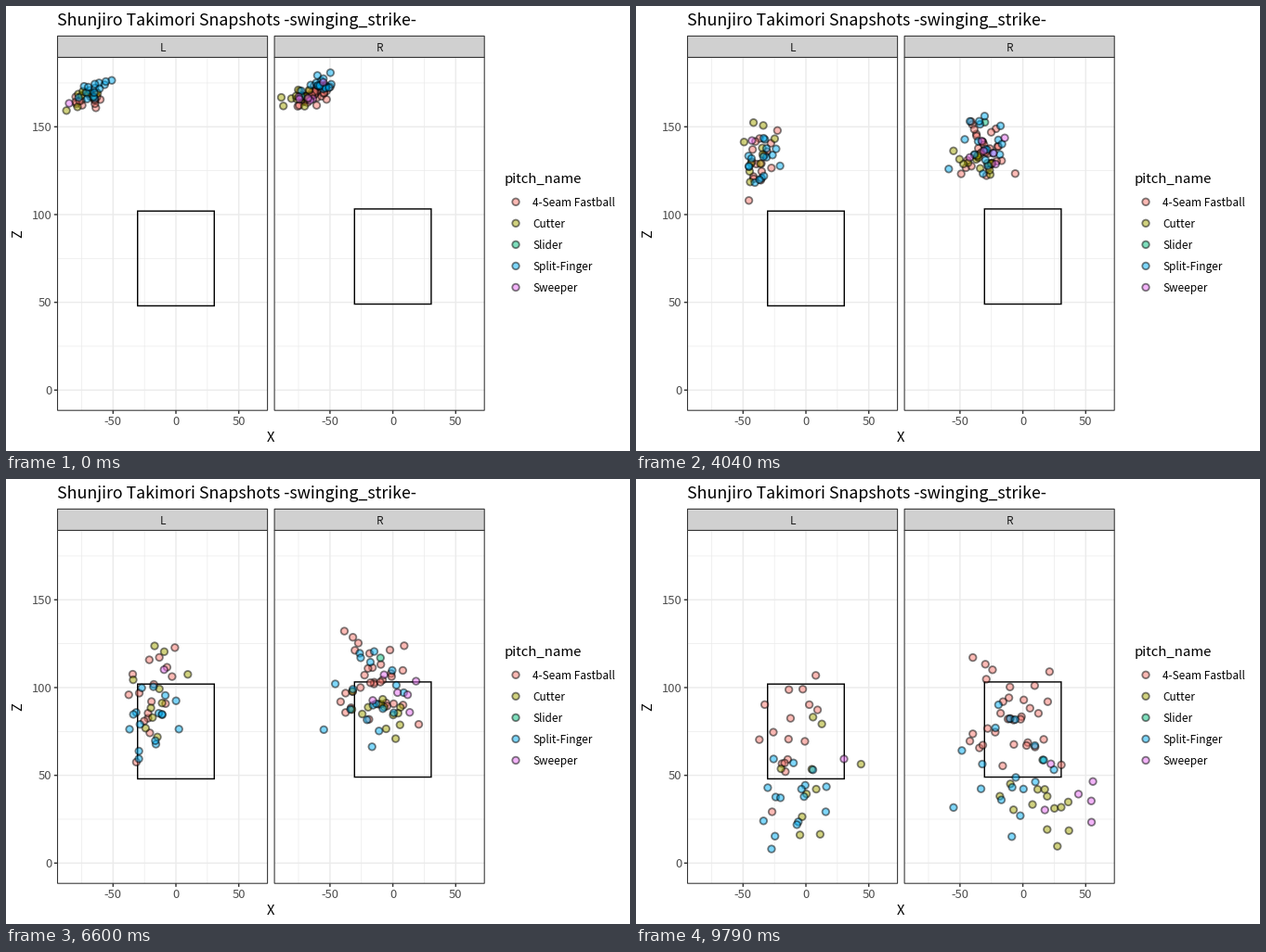
These frames come from a looping animation (672 px wide and 480 px high, 10 s). A matplotlib script:

```python
import numpy as np
import matplotlib.pyplot as plt
from matplotlib.animation import FuncAnimation
from matplotlib.colors import to_rgba
from matplotlib.patches import Rectangle

W, H, DPI = 672, 480, 96
PT = 72 / DPI                  # points per pixel
FRAMES, LOOP_MS = 47, 10000
TOP, BOTTOM = 55.4, 436.2
DARK, GRID = "#333333", "#EBEBEB"

# Colour, arrival frame and the (x, y) bend of the flight path in pixels.
PITCHES = {
    "4-Seam Fastball": ("#F8766D", 38, (-36, 62)),
    "Cutter": ("#A3A500", 43.2, (-8, 150)),
    "Slider": ("#00BF7D", 45, (27, 200)),
    "Split-Finger": ("#00B0F6", 40.4, (-33, 150)),
    "Sweeper": ("#E76BF3", 45.2, (22, 160)),
}

plt.rcParams["font.family"] = ["Noto Sans CJK JP", "DejaVu Sans"]
plt.rcParams["path.snap"] = False
fig = plt.figure(figsize=(W / DPI, H / DPI), dpi=DPI, facecolor="white")
ax = fig.add_axes([0, 0, 1, 1])
ax.set(xlim=(0, W), ylim=(H, 0))
ax.axis("off")


def label(x, y, text, size=11.8, color="black", **kw):
    ax.text(x, y, text, fontsize=size * PT, color=color, **kw)


def tick_label(x, y, value, ha):
    label(x, y, str(value), 13, "#4D4D4D", ha=ha)


def line(x0, y0, x1, y1, color=GRID, width=1.42):
    ax.plot([x0, x1], [y0, y1], color=color, lw=width * PT, zorder=1,
            solid_capstyle="butt")


def box(x0, y0, x1, y1, fill, edge, width, z):
    ax.add_patch(Rectangle((x0, y0), x1 - x0, y1 - y0, facecolor=fill,
                           edgecolor=edge, lw=width * PT, zorder=z))


def dots(xy, names, z):
    return ax.scatter(xy[:, 0], xy[:, 1], s=(7.5 * PT) ** 2, lw=1.8 * PT,
                      facecolors=[to_rgba(PITCHES[n][0], 0.5) for n in names],
                      edgecolors=[(0, 0, 0, 0.5)], zorder=z)


def z_px(z):
    return 414.3 - 1.8933 * z


def panel(left, title, zone_low, zone_high):
    right, zero = left + 226.1, left + 127.5

    def x_px(x):
        return zero + 1.354 * x

    for x in (-75, -25, 25):
        line(x_px(x), TOP, x_px(x), BOTTOM, width=0.7)
    for z in (25, 75, 125, 175):
        line(left, z_px(z), right, z_px(z), width=0.7)
    for z in (0, 50, 100, 150):
        line(left, z_px(z), right, z_px(z))
    for x in (-50, 0, 50):
        line(x_px(x), TOP, x_px(x), BOTTOM)
        line(x_px(x), BOTTOM, x_px(x), BOTTOM + 3.7, DARK)
        tick_label(x_px(x), 452, x, "center")
    box(x_px(-30.5), z_px(zone_high), x_px(30.5), z_px(zone_low),
        "none", "black", 1.42, 3)
    box(left, TOP, right, BOTTOM, "none", DARK, 1.07, 6)
    box(left, 32.4, right, TOP, "#D0D0D0", DARK, 1.07, 6)
    label((left + right) / 2, 49, title, color="#1A1A1A", ha="center", zorder=7)


panel(55.5, "L", 48, 102)
panel(289.1, "R", 49, 103.2)
for z in (0, 50, 100, 150):
    line(51.8, z_px(z), 55.5, z_px(z), DARK)
    tick_label(49.3, z_px(z) + 4.7, z, "right")

label(55, 21, "Shunjiro Takimori Snapshots -swinging_strike-", 17.8)
label(285, 470, "X", 14.7, ha="center")
label(13, 246, "Z", 14.7, ha="center", va="center", rotation=90)
label(537, 191, "pitch_name", 14.9)
legend_y = 211.3 + 23.04 * np.arange(len(PITCHES))
for name, y in zip(PITCHES, legend_y):
    label(567.3, y + 4.7, name)
dots(np.column_stack([np.full(len(PITCHES), 549.0), legend_y]), PITCHES, 5)

rng = np.random.default_rng(7)


def scatter_unit(count):
    """Random 2D points with zero mean and unit spread."""
    if count == 1:
        return np.zeros((1, 2))
    p = np.clip(rng.standard_normal((count, 2)), -1.9, 1.9)
    return (p - p.mean(axis=0)) / p.std(axis=0)


def throw(name, count, release, target, spread=(0, 0)):
    """Start, end, bend and arrival of every pitch in one group."""
    _, arrival, bend = PITCHES[name]
    start = scatter_unit(count) * (9, 5)
    start[:, 1] -= 0.35 * start[:, 0]      # wider arm slots release lower
    end = target + scatter_unit(count) * spread
    when = arrival + 0.7 * scatter_unit(count)[:, :1]
    return [name] * count, start + release, end, np.tile(bend, (count, 1)), when


groups = [
    throw("4-Seam Fastball", 16, (89, 101), (165, 273), (18, 38)),
    throw("4-Seam Fastball", 32, (331, 96), (404, 256), (26, 31)),
    throw("Cutter", 10, (84, 98), (191, 326), (21, 42)),
    throw("Cutter", 13, (315, 99), (437, 354), (23, 19)),
    throw("Slider", 1, (345, 87), (438, 303)),
    throw("Split-Finger", 16, (95, 90), (168, 346), (21, 27)),
    throw("Split-Finger", 18, (338, 85), (401, 313), (28, 38)),
    throw("Sweeper", 1, (68, 105), (224, 302)),
    throw("Sweeper", 6, (326, 97), (473, 342), (21, 21)),
]
names, start, end, bend, arrival = map(np.concatenate, zip(*groups))


def positions(frame):
    """Parabolic flight; a pitch rests once it arrives."""
    u = np.minimum(frame / arrival, 1)
    return start + (end - start) * u - bend * u * (1 - u)


balls = dots(positions(0), names, 4)


def update(frame):
    balls.set_offsets(positions(frame))
    return (balls,)


anim = FuncAnimation(fig, update, frames=FRAMES, interval=LOOP_MS / FRAMES,
                     init_func=lambda: update(0), repeat=True, repeat_delay=0)
plt.show()
```
